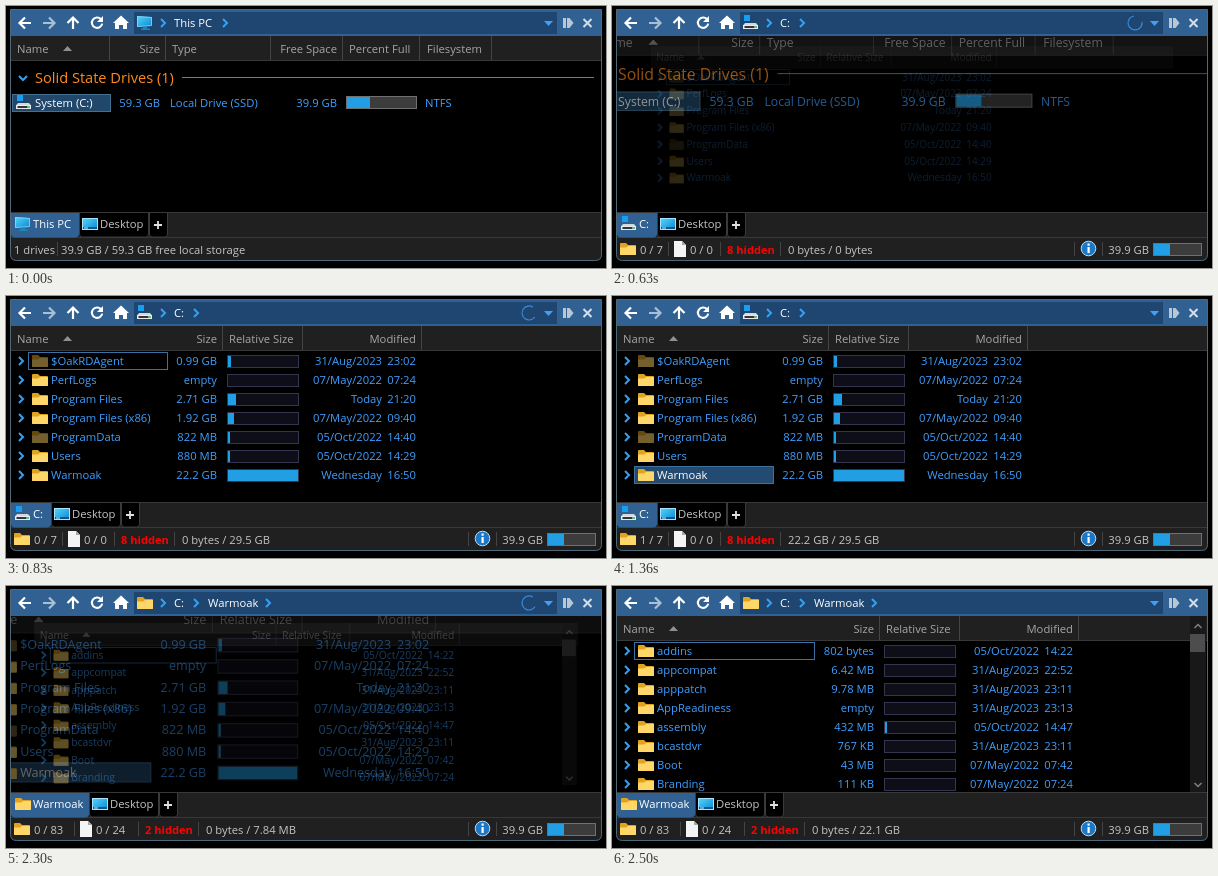
Write an HTML page that moves like this. It is 600 px wide and 262 px high and loops after 3430 ms.

```html
<!DOCTYPE html>
<html lang="en">
<head>
<meta charset="utf-8">
<title>File browser</title>
<style>
  html, body { margin: 0; width: 100%; height: 100%; overflow: hidden; background: #000; }
  svg { display: block; width: 600px; height: 262px; }
  text { font: 11.25px "Open Sans", "Noto Sans", sans-serif; fill: #c4c4c4; }
  .blue { fill: #3f9fff; }
  .white { fill: #fff; }
  .head { fill: #a6a6a6; }
  .group { font-size: 14.6px; fill: #ff8a1c; }
  .red { font-weight: 700; font-size: 11.1px; fill: #f00; }
  .end { text-anchor: end; }
  .layer { mix-blend-mode: screen; }
  #lists { isolation: isolate; }
</style>
</head>
<body>
<svg id="stage" viewBox="0 0 600 262"></svg>
<script>
const LOOP = 3430;
const OPEN_ROOT = 560, ROOT_SIZES = 810, ROOT_READY = 860, SELECT = 1360;
const OPEN_SUB = 2230, SUB_SIZES = 2460, SUB_READY = 2500;
const TICKS = [0, 560, 600, 630, 670, 700, 740, 770, 810, 860, 1360,
  2230, 2260, 2300, 2330, 2360, 2400, 2430, 2460, 2500];
const SUB_NAME = "Warmoak";

// name, size, GB, date, time, hidden
const rootRows = [
  ["$OakRDAgent", "0.99 GB", 0.99, "31/Aug/2023", "23:02", true],
  ["PerfLogs", "empty", 0, "07/May/2022", "07:24"],
  ["Program Files", "2.71 GB", 2.71, "Today", "21:20"],
  ["Program Files (x86)", "1.92 GB", 1.92, "07/May/2022", "09:40"],
  ["ProgramData", "822 MB", 0.82, "05/Oct/2022", "14:40", true],
  ["Users", "880 MB", 0.88, "05/Oct/2022", "14:29"],
  [SUB_NAME, "22.2 GB", 22.2, "Wednesday", "16:50"]
];
const subRows = [
  ["addins", "802 bytes", 0, "05/Oct/2022", "14:22"],
  ["appcompat", "6.42 MB", 0.006, "31/Aug/2023", "22:52"],
  ["apppatch", "9.78 MB", 0.01, "31/Aug/2023", "23:11"],
  ["AppReadiness", "empty", 0, "31/Aug/2023", "23:13"],
  ["assembly", "432 MB", 0.64, "05/Oct/2022", "14:47"],
  ["bcastdvr", "767 KB", 0, "31/Aug/2023", "23:11"],
  ["Boot", "43 MB", 0.04, "07/May/2022", "07:42"],
  ["Branding", "111 KB", 0, "07/May/2022", "07:24"]
];

const rect = (x, y, w, h, fill, extra = "") =>
  `<rect x="${x}" y="${y}" width="${w}" height="${h}" fill="${fill}" ${extra}/>`;
const box = (x, y, w, h, fill, stroke) =>
  rect(x + 0.5, y + 0.5, w - 1, h - 1, fill, `stroke="${stroke}"`);
const text = (x, y, s, cls = "") => `<text x="${x}" y="${y}" class="${cls}">${s}</text>`;
const line = (d, color, width = 2) =>
  `<path d="${d}" fill="none" stroke="${color}" stroke-width="${width}"/>`;
const shape = (d, fill) => `<path d="${d}" fill="${fill}"/>`;
const group = (id, body, cls = "") => `<g id="${id}" class="${cls}">${body}</g>`;
const at = (x, y, body, opacity = 1) =>
  `<g transform="translate(${x} ${y})" opacity="${opacity}">${body}</g>`;
const sep = (x, y, h) => rect(x, y, 1, h, "#444");
const chevron = (x, y, color = "#36a0f0") => line(`M${x - 2} ${y - 4}l4 4l-4 4`, color);
const meter = (x, y, w, part) =>
  box(x, y, w, 13, "#3c3c3c", "#707070") + rect(x + 1, y + 1, Math.round((w - 2) * part), 11, "#229fe4");

// Icons are 16 px wide, placed by their top left corner
const pcIcon = (x, y) => at(x, y,
  shape("M0 1L15 2V11L0 12Z", "url(#screen)") + line("M.5 1.5L14.5 2.5V10.5L.5 11.5Z", "#8fe0ff", 0.7) +
  shape("M6 11.5h4v2h3v1.5h-9v-1.5h2z", "#1b86b8"));
const deskIcon = (x, y) => at(x, y,
  box(0, 2, 16, 12, "url(#screen)", "#a5e4ff") + rect(1, 11, 14, 2, "#0a568f") + rect(2, 11.5, 4, 1, "#d0f0ff"));
const driveIcon = (x, y) => at(x, y,
  rect(1, 0, 6, 6, "#189ef0") + shape("M2 8h11l2 2.5h-15z", "#d4d8da") +
  rect(0, 10, 15, 4, "#e8eaec") + rect(1.5, 11, 10, 2, "#30363a") + rect(12, 11, 2, 2, "#40d860"));
const folderIcon = (x, y, opacity) => at(x, y,
  shape("M0 3q0-1 1-1h5l2 2h7q1 0 1 1v9h-16z", "#e0a320") +
  shape("M0 6.5h6l2-1.5h8v8q0 1-1 1h-14q-1 0-1-1z", "#ffd667"), opacity);
const fileIcon = (x, y) => at(x, y,
  shape("M1 0h8l4 4v12h-12z", "#f4f4f4") + shape("M9 0v4h4z", "#a8a8a8"));

function header(labels, seps) {
  return labels.map(([x, s, cls = ""]) => text(x, 47, s, "head " + cls)).join("") +
    seps.map(x => sep(x, 30, 24)).join("");
}
const headerBar = rect(5, 30, 590, 24, "#202020") + rect(5, 54, 590, 1, "#383838");
const nameHead = text(11, 47, "Name", "head") + shape("M57 45l4.5-5l4.5 5z", "#909090");

function driveList() {
  return headerBar + nameHead +
    header([[154, "Size", "end"], [166, "Type"], [331, "Free Space", "end"],
      [343, "Percent Full"], [421, "Filesystem"]], [103, 159, 264, 336, 413, 485]) +
    line("M13 70l4 4l4-4", "#36a0f0") + text(29, 77, "Solid State Drives (1)", "group") +
    rect(176, 71, 412, 1, "#3a86d8") +
    box(6, 88, 99, 18, "#21486a", "#44708f") + driveIcon(10, 89) +
    text(29, 101, "System (C:)", "white") + text(154, 101, "59.3 GB", "blue end") +
    text(164, 101, "Local Drive (SSD)", "blue") + text(331, 101, "39.9 GB", "blue end") +
    meter(340, 90, 71, 0.327) + text(419, 101, "NTFS", "blue");
}

// `x` is the right edge of the size column; other columns follow from it
function folderList(id, rows, x, max, focusRight) {
  let names = "", sizes = "", dates = "";
  rows.forEach(([name, size, gb, date, time, hidden], i) => {
    const y = 65 + 19 * i;
    names += chevron(15, y) + folderIcon(26, y - 8, hidden ? 0.45 : 1) + text(45, y + 4, name, "blue");
    sizes += text(x, y + 4, size, "blue end") + box(x + 10, y - 6, 72, 13, "#0e0e18", "#34344e") +
      rect(x + 11, y - 5, Math.floor(70 * gb / max), 11, "#229fe4");
    dates += text(x + 165, y + 4, date, "blue end") + text(x + 199, y + 4, time, "blue end");
  });
  const columns = header([[x, "Size", "end"], [x + 12, "Relative Size"], [x + 199, "Modified", "end"]],
    [x + 5, x + 85, x + 204]);
  return headerBar + nameHead +
    group(id + "Focus", box(22, 56, focusRight - 22, 18, "none", "#3c70a4")) + names +
    group(id + "Columns", columns + dates) + group(id + "Sizes", sizes);
}

const selection = group("selection", box(22, 170, 140, 18, "#234a70", "#40709c") +
  folderIcon(26, 171) + text(45, 183, SUB_NAME, "white"));
const scrollbar = rect(578, 30, 16, 176, "#181818") + rect(578, 48, 15, 18, "#4d4d4d") +
  line("M582.5 42l3.5-3.5l3.5 3.5M582.5 197l3.5 3.5l3.5-3.5", "#808080", 1.5);

const toolbar = rect(5, 4, 590, 26, "#306192") + rect(128, 6, 423, 22, "#1f4670") +
  line("M25 17H14M19 11.5l-5.5 5.5l5.5 5.5M67 23V12M61.5 17l5.5-5.5l5.5 5.5", "#fff", 2.2) +
  line("M37 17h11M43 11.5l5.5 5.5l-5.5 5.5", "#a9bfd4", 2.2) +
  line("M95 13.2A5.2 5.2 0 1 0 96.2 17.6", "#fff", 2.1) + shape("M97 10v6h-6z", "#fff") +
  shape("M115 9.5l8 7.5h-2v6h-4v-4h-4v4h-4v-6h-2z", "#fff") +
  shape("M538 15h9l-4.5 5z", "#3f9fff") +
  rect(557, 12, 3, 10, "#b9c7d5") + shape("M561 12h2.5l4 5l-4 5h-2.5z", "#b9c7d5") +
  line("M577.5 13l8 8M585.5 13l-8 8", "#d5dee8", 2) +
  group("spinner", line("M7 1A7 7 0 1 1 1 -7", "#3a8ad8", 1.2));

const crumbs = (id, icon, items) => group(id, icon + chevron(157, 17) +
  items.map(([x, s, end]) => text(x, 21, s, "white") + chevron(end, 17)).join(""));
const address =
  crumbs("pathPc", pcIcon(131, 9), [[168, "This PC", 219]]) +
  crumbs("pathRoot", driveIcon(131, 9), [[168, "C:", 190]]) +
  crumbs("pathSub", folderIcon(131, 9), [[168, "C:", 190], [202, SUB_NAME, 262]]);

// Tabs hang from the list, rounded at the bottom
const tab = (x, width, fill, stroke) =>
  `<path d="M${x + 0.5} 207v21q0 3 3 3h${width - 7}q3 0 3-3v-21" fill="${fill}" stroke="${stroke}"/>`;

function tabs(id, icon, label, width) {
  const x = 8 + width;
  return group(id, tab(x - 3, 70, "#000", "#3a3a3a") + tab(x + 67, 19, "#000", "#3a3a3a") +
    tab(5, width, "#306192", "#306192") + icon(9, 210) + text(27, 222, label, "white") +
    deskIcon(x, 210) + text(x + 18, 222, "Desktop") +
    line(`M${x + 72} 219h8M${x + 76} 215v8`, "#e0e0e0", 1.8));
}

// `d` is the extra width taken by each counter
function status(id, count, files, hidden, d, totals) {
  return group(id, folderIcon(8, 235) + text(28, 248, count) + sep(56 + d, 236, 14) +
    fileIcon(61 + d, 235) + text(78 + d, 248, files) + sep(108 + 2 * d, 236, 14) +
    text(115 + 2 * d, 248, hidden + " hidden", "red") + sep(168 + 2 * d, 236, 14) +
    totals.map(([key, s]) => group(key, text(176 + 2 * d, 248, s))).join(""));
}
const diskInfo = group("diskInfo", sep(462, 236, 14) +
  `<circle cx="476.5" cy="242.5" r="7.3" fill="#1c78c4" stroke="#b9dcf6"/>` +
  rect(475.5, 241, 2.2, 6, "#fff") + rect(475.5, 237.5, 2.2, 2.2, "#fff") +
  sep(490, 236, 14) + text(537, 248, "39.9 GB", "end") + meter(541, 237, 49, 0.34));

document.getElementById("stage").innerHTML =
  `<defs><linearGradient id="screen" x2="1" y2="1"><stop stop-color="#52d6f8"/>
   <stop offset="1" stop-color="#0c86d4"/></linearGradient>
   <clipPath id="view">${rect(5, 30, 590, 176, "#000")}</clipPath></defs>` +
  rect(0, 0, 600, 262, "#000") +
  `<path d="M4.5 3.5H595.5V248.5q0 6-6 6H10.5q-6 0-6-6z" fill="#202020" stroke="#4e6a78"/>` +
  toolbar + address + rect(5, 30, 590, 176, "#000") +
  `<g clip-path="url(#view)"><g id="lists">` +
  group("drives", driveList(), "layer") +
  group("root", folderList("root", rootRows, 211, 22.2, 162) + selection, "layer") +
  group("sub", folderList("sub", subRows, 262, 22.1, 203) + scrollbar, "layer") + "</g></g>" +
  rect(5, 206, 590, 1, "#383838") + rect(5, 231, 590, 1, "#383838") +
  tabs("tabPc", pcIcon, "This PC", 68) + tabs("tabRoot", driveIcon, "C:", 40) +
  tabs("tabSub", folderIcon, SUB_NAME, 78) +
  group("statusPc", text(8, 248, "1 drives") + sep(51, 236, 14) +
    text(55, 248, "39.9 GB / 59.3 GB free local storage")) +
  status("statusRoot", "0 / 7", "0 / 0", 8, 0,
    [["rootEmpty", "0 bytes / 0 bytes"], ["rootTotal", "0 bytes / 29.5 GB"]]) +
  status("statusPicked", "1 / 7", "0 / 0", 8, 0, [["picked", "22.2 GB / 29.5 GB"]]) +
  status("statusSub", "0 / 83", "0 / 24", 2, 12,
    [["subFiles", "0 bytes / 7.84 MB"], ["subTotal", "0 bytes / 22.1 GB"]]) +
  diskInfo;

const el = {};
document.querySelectorAll("g[id]").forEach(g => el[g.id] = g);
const show = (id, on) => el[id].style.display = on ? "" : "none";
const clamp = v => Math.max(0, Math.min(1, v));

function place(id, scale, opacity) {
  show(id, opacity > 0);
  el[id].style.opacity = opacity;
  el[id].setAttribute("transform", `translate(300 118) scale(${scale}) translate(-300 -118)`);
}
// Lists grow from 0.8 to 1 as they enter and from 1 to 1.2 as they leave
function zoom(id, enter, leave) {
  place(id, 0.8 + 0.2 * enter + 0.2 * leave, enter * enter * (1 - leave));
}

function render(time) {
  const t = TICKS.filter(v => v <= time).pop();
  const within = (a, b) => t >= a && t < b;
  const toRoot = t < OPEN_ROOT ? 0 : clamp((t - 525) / 248);
  const toSub = t < OPEN_SUB ? 0 : clamp((t - 2173) / 210);

  zoom("drives", 1, toRoot);
  zoom("root", toRoot, toSub);
  zoom("sub", toSub, 0);

  show("rootSizes", t >= ROOT_SIZES);
  el.rootColumns.setAttribute("transform", `translate(${t < ROOT_SIZES ? -20 : 0} 0)`);
  show("rootFocus", t < SELECT);
  show("selection", t >= SELECT);
  show("subSizes", t >= SUB_SIZES);

  show("pathPc", t < OPEN_ROOT);
  show("pathRoot", within(OPEN_ROOT, OPEN_SUB));
  show("pathSub", t >= OPEN_SUB);
  show("tabPc", t < 600);
  show("tabRoot", within(600, 2260));
  show("tabSub", t >= 2260);

  show("statusPc", t < OPEN_ROOT);
  show("diskInfo", t >= OPEN_ROOT);
  show("statusRoot", within(OPEN_ROOT, SELECT));
  show("rootEmpty", t < ROOT_SIZES);
  show("rootTotal", t >= ROOT_SIZES);
  show("statusPicked", within(SELECT, OPEN_SUB));
  show("statusSub", t >= OPEN_SUB);
  show("subFiles", t < SUB_READY);
  show("subTotal", t >= SUB_READY);

  show("spinner", within(600, ROOT_READY) || within(OPEN_SUB, SUB_READY));
  el.spinner.setAttribute("transform", `translate(523 17) rotate(${(t - 700) * 0.24})`);
}

const start = performance.now();
function frame() {
  render((performance.now() - start) % LOOP);
  requestAnimationFrame(frame);
}
frame();
</script>
</body>
</html>
```
